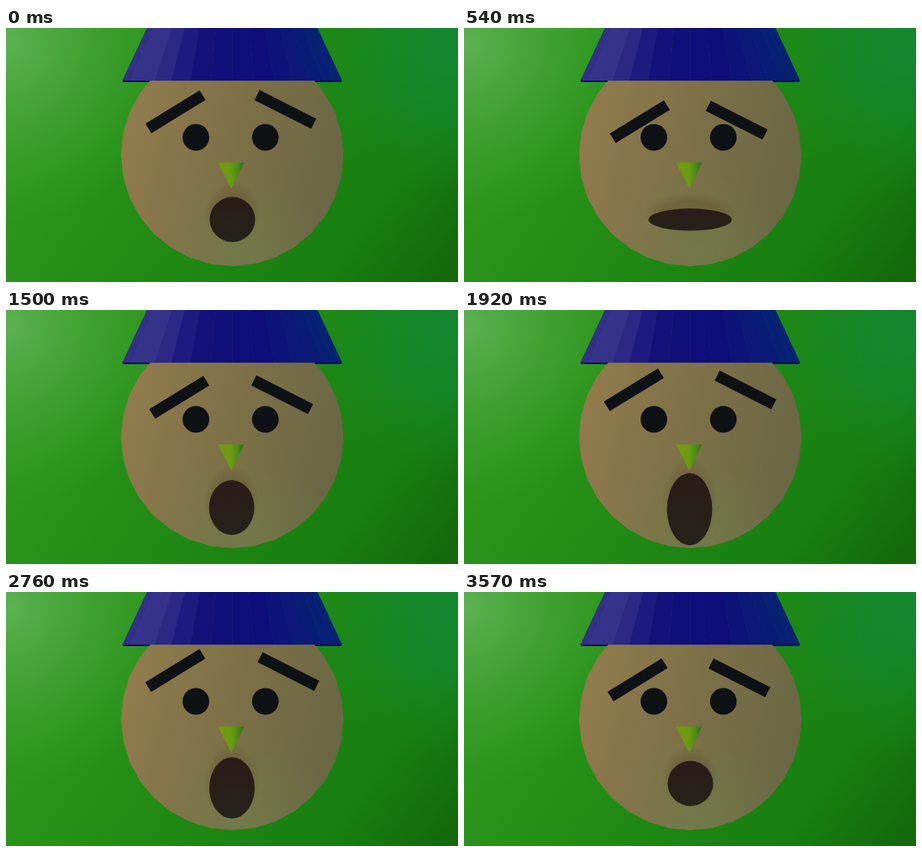
These frames come from a looping animation (576x324 px, 3600 ms). An HTML page:

```html
<!DOCTYPE html>
<html lang="en">
<head>
<meta charset="utf-8">
<title>Worried face</title>
<style>
html, body { margin: 0; width: 100%; height: 100%; overflow: hidden; background: #1f8a16; }
svg { display: block; width: 100vw; height: 100vh; }
</style>
</head>
<body>
<svg viewBox="0 0 576 324" preserveAspectRatio="none">
  <defs>
    <linearGradient id="wall" gradientUnits="userSpaceOnUse" x1="60" y1="40" x2="520" y2="370">
      <stop offset="0" stop-color="#31991f"/>
      <stop offset=".45" stop-color="#208a14"/>
      <stop offset=".8" stop-color="#177e10"/>
      <stop offset="1" stop-color="#13690c"/>
    </linearGradient>
    <radialGradient id="glowA" gradientUnits="userSpaceOnUse" cx="0" cy="20" r="230">
      <stop offset="0" stop-color="#62b359" stop-opacity=".9"/>
      <stop offset=".45" stop-color="#52ac46" stop-opacity=".5"/>
      <stop offset="1" stop-color="#3ba52e" stop-opacity="0"/>
    </radialGradient>
    <radialGradient id="glowB" gradientUnits="userSpaceOnUse" cx="560" cy="30" r="180">
      <stop offset="0" stop-color="#138936" stop-opacity=".85"/>
      <stop offset=".5" stop-color="#148830" stop-opacity=".55"/>
      <stop offset="1" stop-color="#178a20" stop-opacity="0"/>
    </radialGradient>
    <linearGradient id="skin" gradientUnits="userSpaceOnUse" x1="155" y1="130" x2="425" y2="195">
      <stop offset="0" stop-color="#907b4c"/>
      <stop offset=".45" stop-color="#7f7148"/>
      <stop offset="1" stop-color="#696745"/>
    </linearGradient>
    <radialGradient id="bounce" gradientUnits="userSpaceOnUse" cx="300" cy="290" r="110">
      <stop offset="0" stop-color="#6f8049" stop-opacity=".65"/>
      <stop offset="1" stop-color="#6f8049" stop-opacity="0"/>
    </radialGradient>
    <linearGradient id="horn">
      <stop offset="0" stop-color="#78980f"/>
      <stop offset=".5" stop-color="#699c12"/>
      <stop offset=".75" stop-color="#4f8a18"/>
      <stop offset="1" stop-color="#2f6c1c"/>
    </linearGradient>
    <linearGradient id="inside" x1="0" y1="0" x2="0" y2="1">
      <stop offset="0" stop-color="#2c1b18"/>
      <stop offset="1" stop-color="#24231a"/>
    </linearGradient>
    <radialGradient id="shade">
      <stop offset=".6" stop-color="#60402a" stop-opacity=".3"/>
      <stop offset="1" stop-color="#60402a" stop-opacity="0"/>
    </radialGradient>
  </defs>

  <rect width="576" height="324" fill="url(#wall)"/>
  <rect width="576" height="324" fill="url(#glowA)"/>
  <rect width="576" height="324" fill="url(#glowB)"/>

  <path d="M148.500 66H428L427 69H149Z" fill="#080a4c"/>
  <polygon class="head" fill="url(#skin)"/>
  <polygon class="head" fill="url(#bounce)"/>
  <g id="hat"></g>

  <ellipse id="halo" fill="url(#shade)"/>
  <ellipse id="mouth" fill="url(#inside)"/>
  <path d="M270 171.500H303.500L287.300 205Z" fill="url(#horn)"/>
  <g fill="#0e1215">
    <circle cx="242" cy="139.500" r="17"/>
    <circle cx="330.500" cy="139.500" r="17"/>
    <rect id="browL" x="-40.500" y="-7.200" width="81" height="14.400"/>
    <rect id="browR" x="-40.500" y="-7.200" width="81" height="14.400"/>
  </g>
</svg>
<script>
const LOOP = 3600, STEP = 30, SIDES = 32;
const el = id => document.getElementById(id);

function set(node, attrs) {
  for (const name in attrs) node.setAttribute(name, attrs[name]);
}

// Key poses: time, then left brow x y, right brow x y.
const brows = [
  [0, 216, 106.9, 356, 103.8],
  [570, 224.1, 119.6, 347.4, 117.7],
  [1170, 223, 116.6, 348.7, 112.3],
  [2370, 213.9, 96.1, 362.8, 98.8],
  [3570, 221.2, 112.1, 351, 109.5]
];
// Key poses: time, then centre x y, radius x y.
const round = [288.5, 244.3, 29, 28.7];
const mouth = [
  [0, ...round],
  [570, 288.2, 244.5, 53.2, 14],
  [1170, 287.7, 249.8, 29, 25.4],
  [2070, 287.5, 254.3, 28.8, 47.3],
  [3570, ...round]
];

// Slope at key i: flat at turns and ends, else the harmonic mean of both sides.
function slope(keys, i, k) {
  if (!keys[i - 1] || !keys[i + 1]) return 0;
  const rate = j => (keys[j + 1][k] - keys[j][k]) / (keys[j + 1][0] - keys[j][0]);
  const a = rate(i - 1), b = rate(i);
  return a * b > 0 ? 2 * a * b / (a + b) : 0;
}

function sample(keys, t) {
  let i = 0;
  while (i < keys.length - 2 && t >= keys[i + 1][0]) i++;
  const a = keys[i], b = keys[i + 1], span = b[0] - a[0];
  const u = Math.min(1, (t - a[0]) / span), w = 1 - u;
  return a.map((v, k) => v + (b[k] - v) * u * u * (3 - 2 * u)
    + span * u * w * (slope(keys, i, k) * w - slope(keys, i + 1, k) * u)).slice(1);
}

function place(id, x, y, angle) {
  el(id).setAttribute('transform', `translate(${x} ${y}) rotate(${angle})`);
}

function draw(t) {
  const [lx, ly, rightX, rightY] = sample(brows, t);
  place('browL', lx, ly, -31.6);
  place('browR', rightX, rightY, 26.9);
  const [cx, cy, rx, ry] = sample(mouth, t);
  set(el('mouth'), { cx, cy, rx, ry });
  set(el('halo'), { cx, cy: cy - 9, rx: rx + 7, ry: ry + 11 });
}

function buildHead() {
  const points = Array.from({ length: SIDES }, (_, i) => {
    const a = i * 2 * Math.PI / SIDES;
    return [288.3 + 141.7 * Math.cos(a), 162 + 141.7 * Math.sin(a)];
  }).join(' ');
  document.querySelectorAll('.head').forEach(node => set(node, { points }));
}

// Cone facets, lit from the left with a faint cool rim on the right.
function buildHat() {
  const n = SIDES / 2, edge = i => -Math.cos(i * Math.PI / n);
  for (let i = 0; i < n; i++) {
    const p = edge(i), q = edge(i + 1), u = (p + q + 2) / 4;
    const light = Math.exp(-(((u - .08) / .17) ** 2)), rim = Math.max(0, u - .65) / .35;
    const fill = `rgb(${22 - 14 * u + 34 * light},${18 - 6 * u + 34 * light + 22 * rim},${122 + 18 * light - 6 * rim})`;
    const x = (s, r) => 288.3 + s * r;
    const facet = document.createElementNS('http://www.w3.org/2000/svg', 'polygon');
    set(facet, {
      points: `${x(p, 108.5)},0 ${x(q, 108.5)},0 ${x(q, 139.8)},67 ${x(p, 139.8)},67`,
      fill, stroke: fill, 'stroke-width': .4
    });
    el('hat').append(facet);
  }
}

buildHead();
buildHat();
const start = performance.now();
function tick() {
  const t = (performance.now() - start) % LOOP;
  draw(Math.floor(t / STEP) * STEP);
  requestAnimationFrame(tick);
}
draw(0);
requestAnimationFrame(tick);
</script>
</body>
</html>
```
